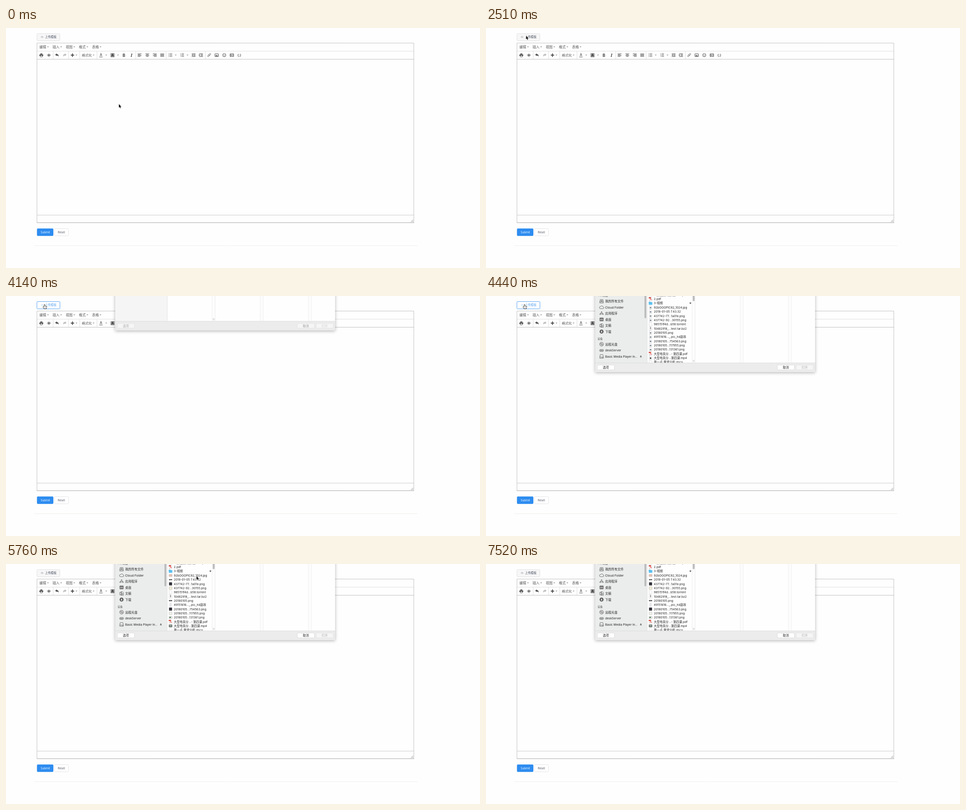
An HTML page with a canvas that plays this animation: 1050 px wide and 533 px high, repeating every 8000 ms.

```html
<!DOCTYPE html>
<html lang="zh">
<head>
<meta charset="utf-8">
<title>Template upload</title>
<style>
html, body { margin: 0; width: 100%; height: 100%; overflow: hidden; background: #fefefe; }
canvas { display: block; width: 1050px; height: 533px; }
</style>
</head>
<body>
<canvas id="stage"></canvas>
<script>
const W = 1050, H = 533, LOOP = 8000;
const canvas = document.getElementById('stage');
const ctx = canvas.getContext('2d');
const dpr = window.devicePixelRatio || 1;
canvas.width = W * dpr;
canvas.height = H * dpr;

const CJK = '"Noto Sans CJK SC", "Noto Sans CJK", sans-serif';
const WEB = '"Open Sans", ' + CJK;
const UI = 'Inter, ' + CJK;
const INK = '#4f4f4f', BLUE = '#57a3f3';

// Drawing helpers
function box(x, y, w, h, fill, stroke, r = 0, lw = 1) {
  ctx.beginPath();
  ctx.roundRect(x, y, w, h, r);
  if (fill) { ctx.fillStyle = fill; ctx.fill(); }
  if (stroke) { ctx.strokeStyle = stroke; ctx.lineWidth = lw; ctx.stroke(); }
}
function line(x1, y1, x2, y2, color, lw = 1) {
  ctx.beginPath();
  ctx.moveTo(x1, y1);
  ctx.lineTo(x2, y2);
  ctx.strokeStyle = color;
  ctx.lineWidth = lw;
  ctx.stroke();
}
function text(s, x, y, size, color, family = UI, style = '') {
  ctx.font = `${style} ${size}px ${family}`;
  ctx.fillStyle = color;
  ctx.fillText(s, x, y + size * 0.37);
}
function shape(d, x, y, fill, stroke, lw = 1) {
  const p = new Path2D(d);
  ctx.save();
  ctx.translate(x, y);
  if (stroke) { ctx.strokeStyle = stroke; ctx.lineWidth = lw; ctx.stroke(p); }
  if (fill) { ctx.fillStyle = fill; ctx.fill(p); }
  ctx.restore();
}
function disc(x, y, rx, ry, fill, stroke, lw = 0.8) {
  ctx.beginPath();
  ctx.ellipse(x, y, rx, ry, 0, 0, 7);
  if (fill) { ctx.fillStyle = fill; ctx.fill(); }
  if (stroke) { ctx.strokeStyle = stroke; ctx.lineWidth = lw; ctx.stroke(); }
}
const caret = (x, y) => shape('M-2-1H2L0 1Z', x, y, '#888');

// Toolbar icons, each centred on x
const MID = 60.3;
function rows(x, count, left, right, gap = 1.9) {
  for (let i = 0; i < count; i++) {
    const y = MID + (i - (count - 1) / 2) * gap;
    line(x + left(i), y, x + right(i), y, INK, 1);
  }
}
const wide = () => 4.2, start = () => -4.2;
const short = i => i % 2 ? 1.8 : 4.2;

function indent(x, dir) {
  rows(x, 4, i => i % 3 ? -0.6 : -4.2, wide, 2.1);
  shape(`M${-1.5 * dir}-2L${1.3 * dir} 0L${-1.5 * dir} 2Z`, x - 3, MID, INK);
}
function frame(x) {
  box(x - 3.9, MID - 3, 7.8, 6, null, INK, 0.3, 1);
}
const CURL = 'M-4-1L-.6-4V-2.2C3-2 4 0 3 3.4C2.3 1.3 1.4.6-.6.6V2.2Z';

function drawIcons() {
  box(76, 56.5, 4.5, 2, INK);
  box(74, 58.7, 8.4, 3.5, INK, null, 0.6);
  box(76, 61, 4.5, 3.2, '#fff', INK, 0, 0.9);

  shape('M-4 0Q0-5 4 0Q0 5-4 0Z', 95, MID, null, INK, 0.9);
  disc(95, MID, 1.6, 1.6, INK);

  shape(CURL, 113, MID, INK);
  ctx.save();
  ctx.translate(130, MID);
  ctx.scale(-1, 1);
  shape(CURL, 0, 0, '#bcbcbc');
  ctx.restore();

  line(143.5, MID, 151, MID, INK, 2);
  line(147.2, 56.5, 147.2, 64, INK, 2);
  text('格式化', 168, MID, 7.4, '#595959', CJK);

  text('A', 207.8, 59.6, 7.6, INK, UI, '500');
  line(206.5, 64.3, 214, 64.3, INK, 1);
  box(232, 56.5, 8, 8, '#999', '#777', 0, 0.6);
  text('A', 233.6, MID, 7, '#222', UI, '600');

  text('B', 258.2, MID, 9, '#444', UI, 'bold');
  text('I', 276, MID, 9.5, '#444', '"Noto Serif", serif', 'italic bold');

  rows(296, 4, start, short);
  rows(313, 4, i => i % 2 ? -2.5 : -4.2, i => i % 2 ? 2.5 : 4.2);
  rows(329.5, 4, i => -short(i), wide);
  rows(346, 4, start, wide);

  rows(364, 3, () => -1.6, wide, 2.9);
  rows(364, 3, start, () => -2.8, 2.9);
  rows(390, 3, () => -1.2, wide, 2.9);
  ['1', '2', '3'].forEach((n, i) => text(n, 386, MID + (i - 1) * 2.9, 3.2, INK));

  indent(415.5, -1);
  indent(432, 1);

  for (const side of [-1, 1]) {
    ctx.save();
    ctx.translate(450 + side * 1.5, MID - side * 1.5);
    ctx.rotate(-Math.PI / 4);
    box(-2.2, -1.3, 4.4, 2.6, null, INK, 1.3, 0.9);
    ctx.restore();
  }

  frame(466.7);
  shape('M-3 2.2L-1-.8L.4 1L1.4 0L3 2.2Z', 466.7, MID, INK);
  disc(483.5, MID, 3.7, 3.7, null, INK, 0.9);
  disc(482, 59.2, 0.6, 0.7, INK);
  disc(485, 59.2, 0.6, 0.7, INK);
  shape('M-2 .8Q0 3.6 2 .8', 483.5, MID, null, INK, 0.8);
  frame(500.3);
  for (const dx of [-2.6, 2.6]) line(500.3 + dx, 57.5, 500.3 + dx, 63, INK, 0.8);
  shape('M-1.2-1.6L1.5 0L-1.2 1.6Z', 500.3, MID, INK);
  text('{;}', 512.6, MID - 0.3, 7, INK, UI, '600');

  [156, 194, 222, 248, 376, 402].forEach(x => caret(x, MID));
  [104.5, 138.5, 163.5, 201.5, 287.5, 354.5, 441.5]
    .forEach(x => line(x, 52, x, 69, '#dfdfdf'));
}

function drawUpload(hover, focus) {
  if (focus) box(67.4, 11.4, 53.2, 18.2, '#dcebfc', null, 3);
  box(68.6, 12.4, 50.8, 16, hover ? '#fff' : '#f7f7f7', hover ? BLUE : '#dddee1', 2, 0.9);
  const tint = hover ? '#c4dffb' : '#b8bbc0';
  disc(80, 20, 2.7, 1.7, null, tint, 0.8);
  disc(80, 20, 0.9, 0.9, tint);
  text('上传模板', 86.2, 20, 6.45, hover ? BLUE : '#495060', CJK);
}

function drawPage() {
  ctx.fillStyle = '#fefefe';
  ctx.fillRect(0, 0, W, H);

  box(68.6, 33.4, 834.8, 399, '#fefefe', '#c2c2c2');
  line(69, 51.4, 903, 51.4, '#dfdfdf');
  line(68, 69.4, 904, 69.4, '#bebebe');
  line(68, 415.5, 904, 415.5, '#cacaca');
  line(68, 432.4, 904, 432.4, '#b2b2b2');
  ['编辑', '插入', '视图', '格式', '表格'].forEach((s, i) => {
    text(s, 74 + i * 29.2, 42.2, 7.5, '#595959', CJK);
    caret(93 + i * 29.1, 42);
  });
  drawIcons();
  for (const d of [1.5, 3.5, 5.5]) line(902 - d, 431, 902, 431 - d, '#999', 0.8);

  box(68.6, 445.2, 36.3, 16.5, '#2d8cf0', null, 2);
  text('Submit', 77, 453.3, 6.2, '#fff', WEB);
  box(107.5, 445.6, 31, 15.8, '#fff', '#dddee1', 2, 0.8);
  text('Reset', 114.8, 453.3, 6.2, '#495060', WEB);
  line(62, 483.4, 911, 483.4, '#efeff1');
}

// File dialog
const PLACES = [
  ['我的所有文件', 11.5], ['Cloud Folder', 25], ['应用程序', 38.5], ['桌面', 52],
  ['文稿', 65.5], ['下载', 79], ['远程光盘', 107], ['deskServer', 120.7],
  ['Basic Media Player In...', 134.2]
];

function placeIcon(i, y) {
  const x = 256, c = '#606060';
  const outline = (d, lw = 0.9) => shape(d, x, y, null, c, lw);
  switch (i) {
    case 0: outline('M-3-3.5H3L4 1.5V4H-4V1.5Z M-4 1.5H4 M-2-1.5H2 M-2 0H2'); break;
    case 1: outline('M-2.8 3H3A2 2 0 0 0 3.2-1A2.8 2.8 0 0 0-2-1.6A2.3 2.3 0 0 0-2.8 3Z'); break;
    case 2: outline('M-3.5 3.5L0-4L3.5 3.5M-4.7 1.3H4.7', 1); break;
    case 3:
      box(x - 4, y - 3.3, 8, 6.8, '#aaa', c, 0.5, 0.9);
      line(x - 4, y - 2.2, x + 4, y - 2.2, c, 1.4);
      line(x - 3, y + 2, x + 3, y + 2, c, 1);
      break;
    case 4: outline('M-4-2.5H0V3H-4Z M-1-4H2L4-2V4H-1Z M1 0H3M1 2H3'); break;
    case 5:
      disc(x, y, 4.4, 4.4, '#585858');
      shape('M-.7-2.5H.7V0H2.2L0 2.7L-2.2 0H-.7Z', x, y, '#eee');
      break;
    case 6:
      disc(x, y, 4.3, 4.3, '#d2d2d2', c);
      disc(x, y, 1.4, 1.4, '#eee', c, 0.7);
      line(x - 3, y - 2, x - 1, y - 1, c, 0.7);
      line(x + 1, y + 1, x + 3, y + 2, c, 0.7);
      break;
    case 7:
      box(x - 4, y - 1.8, 8, 4, '#ccc', c, 0.7, 0.9);
      line(x - 2.5, y + 0.5, x + 2.5, y + 0.5, c, 0.8);
      break;
    default:
      outline('M-3-4H3L4 1.5V4H-4V1.5Z M-4 1.5H4');
      line(x + 1.5, y + 2.8, x + 3, y + 2.8, c, 0.8);
  }
}

const FILES = [
  ['1-课程资料说明_1228.pdf', 'pdf'], ['2.pdf', 'pdf'], ['3-视频', 'folder'],
  ['92bOOOPIC82_1024.jpg', 'photo'], ['2018-01-05 7.43.32', 'strip'],
  ['437742-77...1a01e.png', 'dark'], ['437742-92...30155.png', 'beige'],
  ['985151f4d...b58.torrent', 'page'], ['10482918_...test.tar.bz2', 'zip'],
  ['20180105.png', 'strip'], ['49151616..._.pic_hd副本', 'narrow'],
  ['20180105...754563.png', 'dark'], ['20180105...117955.png', 'light'],
  ['20180105...131361.png', 'green'], ['大型电商分...- 第四课.pdf', 'pdf'],
  ['大型电商分...第四课.mp4', 'movie'], ['第一点 需求分析.docx', 'page']
];

function sheet(x, y) {
  shape('M-2.8-3.8H1L2.8-2V3.8H-2.8Z', x, y, '#fff', '#b5b5b5', 0.8);
}
function fileIcon(kind, y, loaded) {
  const x = 364.5;
  const tile = (w, h, fill, edge) => box(x - w / 2, y - h / 2, w, h, fill, edge, 0, 0.7);
  if (kind === 'folder') {
    box(x - 4, y - 3.4, 4, 2, '#3fa9e0', null, 0.5);
    box(x - 4, y - 2.6, 8, 6, '#5cc0f0', null, 0.6);
  } else if (kind === 'pdf') {
    sheet(x, y);
    box(x - 4, y - 3.8, 5, 2.2, '#d5281e');
    shape('M-1.5 2.7Q1 0 0-1.2Q0 1 3 2', x, y, null, '#d5281e', 0.9);
  } else if (kind === 'page') {
    sheet(x, y);
  } else if (kind === 'zip') {
    sheet(x, y);
    line(x, y - 3.3, x, y + 2, '#555', 1.2);
  } else if (!loaded) {
    sheet(x, y);
    disc(x, y + 0.5, 1.8, 1.8, kind === 'movie' ? '#333' : '#7b8793');
  } else if (kind === 'photo') {
    tile(6.6, 4.6, '#f3dcd3', '#b69488');
    line(x - 2, y, x + 2, y, '#d28d7d', 1);
  } else if (kind === 'strip') {
    tile(7, 2.2, '#3b3b3b');
    line(x - 2, y, x + 2, y, '#888', 0.6);
  } else if (kind === 'dark') {
    tile(6.6, 6.8, '#2c2d35');
    line(x - 2, y + 1, x + 1, y + 1, '#666', 0.7);
  } else if (kind === 'beige') {
    tile(6.6, 6, '#f0eddc', '#bdb9a4');
  } else if (kind === 'narrow') {
    tile(3.2, 6.4, '#ececf0', '#c9c9cf');
  } else if (kind === 'light') {
    tile(6.6, 6, '#efefeb', '#c2c2ba');
  } else if (kind === 'green') {
    tile(7, 4.6, '#f3f3f3', '#aaa');
    box(x - 2.3, y - 1.2, 3, 2.4, '#3e7247');
  } else {
    tile(7.4, 5.4, '#454c49');
    box(x - 2.8, y - 1.3, 5.6, 2.4, '#b9d0bc');
  }
}

function dialogContent(loaded) {
  ctx.save();
  ctx.beginPath();
  ctx.rect(242, 0, 487, 148.3);
  ctx.clip();
  text('个人收藏', 247, -1.4, 5.8, '#666', CJK, '500');
  text('设备', 247, 95, 5.7, '#555', CJK, '500');
  text('共享的', 247, 150.7, 5.8, '#666', CJK, '500');
  PLACES.forEach(([name, y], i) => {
    placeIcon(i, y);
    text(name, 264, y, i > 5 && i !== 6 ? 6.55 : 6.8, '#222');
  });
  shape('M-2 .6L0-2L2 .6ZM-2 1.4H2V2.2H-2Z', 343, 134, '#444');
  box(351, -10, 4, 59.5, '#bcbcbc', null, 2);

  FILES.forEach(([name, kind], i) => {
    const y = -2.6 + i * 9.34;
    fileIcon(kind, y, loaded);
    text(name, 371.8, y, 6.5, '#222');
  });
  shape('M-1.7-2L2 0L-1.7 2Z', 453.2, 15.7, '#444');
  box(458, -10, 4.2, 21.4, '#bcbcbc', null, 2);
  ctx.restore();
}

function drawDialog(t) {
  const ready = t >= 4440;
  const slide = t < 4290 ? -92.5 : ready ? 0 : -8;
  ctx.save();
  ctx.translate(0, slide);
  ctx.save();
  ctx.shadowColor = 'rgba(0,0,0,.3)';
  ctx.shadowBlur = 7 * dpr;
  ctx.shadowOffsetY = 1.5 * dpr;
  box(242, -60, 487, 229, '#ececec');
  ctx.restore();
  box(242, -60, 115, 208.5, ready ? '#ebecec' : '#f5f5f5');
  box(357, -60, 372, 208.5, '#fefefe');
  line(357.2, -60, 357.2, 148, '#dadada', 0.7);
  for (const x of [456.5, 563, 670]) {
    box(x, -60, 6.8, 208.5, '#fcfcfc');
    line(x, -60, x, 148, '#ebebeb', 0.8);
    line(x + 6.8, -60, x + 6.8, 148, '#ebebeb', 0.8);
  }
  if (ready) dialogContent(t >= 4880);
  for (const x of [459, 461]) line(x, 142, x, 146.2, '#bbb', 0.8);
  line(242, 148.6, 729, 148.6, '#d8d8d8', 0.8);

  [['选项', 246.5], ['取消', 645.2], ['打开', 687]].forEach(([label, x], i) => {
    const off = !ready || i === 2;
    box(x, 153.2, 38, 10.8, off ? '#f5f5f5' : '#fff', off ? '#dedede' : '#d2d2d2', 1.8, 0.7);
    const color = ready ? (i === 2 ? '#aaa' : '#222') : ['#aaa', '#999', '#ccc'][i];
    text(label, x + 12.3, 158.6, 6.7, color, CJK);
  });
  ctx.restore();
}

// Pointer path: start, end, number of poses, from, to
const PATH = [
  [0, 0, 1, [250, 169]],
  [150, 150, 1, [243.8, 165]],
  [420, 420, 1, [216, 157]],
  [1460, 2360, 7, [219, 156.5], [89.5, 19]],
  [2510, 2510, 1, [88.8, 17.3]],
  [3100, 3550, 4, [88, 17.8], [85.5, 19.3]],
  [4590, 4590, 1, [85.3, 19.4]],
  [4730, 5170, 4, [140, 22], [386, 33]],
  [5320, 5760, 4, [397, 32], [422, 27]],
  [5910, 6340, 4, [428, 22], [446, 1]],
  [6490, 7520, 8, [446, 0], [450, -12]]
];

function pointerAt(t) {
  const [from, to, n, a, b = a] = PATH.filter(s => s[0] <= t).pop();
  if (n === 1) return a;
  const step = Math.min(n - 1, Math.floor((t - from) / (to - from) * (n - 1) + 0.03));
  let p = step / (n - 1);
  if (n === 7) p = p * p * (3 - 2 * p);
  return a.map((v, i) => v + (b[i] - v) * p);
}

const ARROW = 'M0 0V7.8L1.8 6.2L3 9.2L4.4 8.6L3.2 5.8H5.6Z';
const HAND = 'M-.9 5V1A.8 .8 0 0 1 .7 1V3.4L3.4 4Q4.4 4.3 4.2 5.5L3.5 9H-.8L-3 6Q-3.3 4.6-2 4.8Z';

function drawPointer(t) {
  const [x, y] = pointerAt(t);
  if (t >= 3100 && t < 4590) {
    shape(HAND, x, y - 0.3, '#fff', '#111', 1.5);
    for (const dx of [0.4, 1.7]) line(x + dx, y + 5.5, x + dx, y + 7.5, '#444', 0.6);
  } else {
    shape(ARROW, x, y, '#111', '#fff', 1.3);
  }
}

function draw(now) {
  const t = now % LOOP;
  ctx.setTransform(dpr, 0, 0, dpr, 0, 0);
  drawPage();
  drawUpload(t >= 3100 && t < 4880, t >= 3550 && t < 4880);
  if (t >= 4140) drawDialog(t);
  drawPointer(t);
}

const begin = performance.now();
function tick() {
  draw(performance.now() - begin);
  requestAnimationFrame(tick);
}
tick();
</script>
</body>
</html>
```
